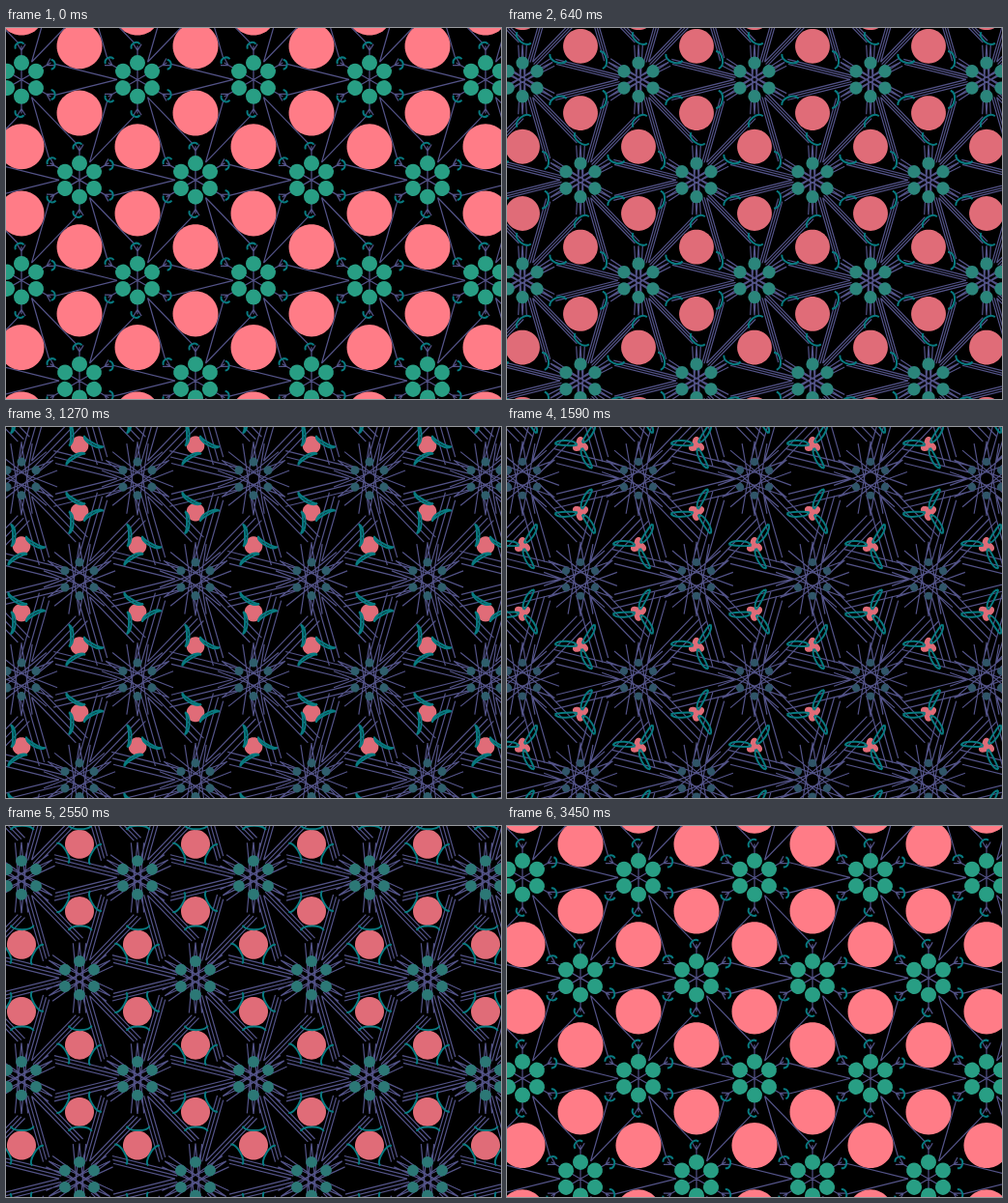
An HTML page with a canvas that plays this animation: 512 px wide and 384 px high, repeating every 3490 ms.

```html
<!DOCTYPE html>
<html lang="en">
<head>
<meta charset="utf-8">
<title>Kaleidoscope tiling</title>
<style>
html, body { margin: 0; width: 100%; height: 100%; overflow: hidden; background: #000; }
canvas { display: block; width: 512px; height: 384px; }
</style>
</head>
<body>
<canvas id="stage" width="512" height="384"></canvas>
<script>
const ctx = document.getElementById('stage').getContext('2d');
const LOOP = 3490, SIDE = 120, ROW = SIDE * Math.sqrt(3) / 2, GAP = SIDE / Math.sqrt(3);
const TAU = Math.PI * 2, RAD = Math.PI / 180;

// Hold time of each step, in hundredths of a second
const holds = '9 9 5 9 9 9 5 9 9 9 4 9 10 9 4 9 9 9 9 5 9 9 9 5 9 9 9 5 9 9 9 5 9 9 9 4 9 9 9 9 5 9 9 4'
  .split(' ').map(Number);

// Teal blade: time, distance and direction of its middle, bulge direction,
// half length, bulge of each of its two edges
const bladeKeys = [
  [0, 35, 93, 240, 5, 4, 4],
  [410, 33, 80, 380, 7.5, 5.5, 5.5],
  [950, 16, 95, 635, 11.5, 5.5, 5.5],
  [1590, 15, 177, 807, 11.5, 4, -1],
  [2000, 19, 134, 800, 11, 7, 7],
  [2550, 20, 88, 990, 12, 4.5, 4.5],
  [3490, 35, 93, 1320, 5, 4, 4]
];

const lerp = (a, b, k) => a + (b - a) * k;
const mix = (a, b, k) => `rgb(${a.map((v, i) => Math.round(lerp(v, b[i], k)))})`;

function stepTime(t) {
  let start = 0;
  for (const h of holds) {
    if (t < start + h * 10) break;
    start += h * 10;
  }
  return start;
}

function bladeAt(t) {
  const i = Math.max(1, bladeKeys.findIndex(k => k[0] > t));
  const a = bladeKeys[i - 1], b = bladeKeys[i];
  const k = (t - a[0]) / (b[0] - a[0]);
  return a.map((v, j) => lerp(v, b[j], k));
}

function at(x, y, draw, flip = 1) {
  ctx.save();
  ctx.translate(x, y);
  ctx.scale(1, flip);
  draw();
  ctx.restore();
}

function turns(n, draw) {
  for (let i = 0; i < n; i++) {
    ctx.save();
    ctx.rotate(i * TAU / n);
    draw();
    ctx.restore();
  }
}

function disc(x, y, r, color) {
  ctx.fillStyle = color;
  ctx.beginPath();
  ctx.arc(x, y, r, 0, TAU);
  ctx.fill();
}

function line(x1, y1, x2, y2) {
  ctx.moveTo(x1, y1);
  ctx.lineTo(x2, y2);
}

// Pink disc that turns three-cornered when smallest, with three teal blades
function blossom(u, blade) {
  const r = 23.5 - 16.5 * u, lobe = 0.28 * u ** 20;
  ctx.fillStyle = mix([255, 124, 135], [224, 108, 120], Math.min(1, u * 7));
  ctx.beginPath();
  for (let a = 0; a < TAU; a += TAU / 60) {
    const d = r * (1 - lobe * Math.sin(3 * a));
    ctx.lineTo(d * Math.cos(a), d * Math.sin(a));
  }
  ctx.fill();

  const [, dist, dir, bulge, half, ...edges] = blade;
  ctx.strokeStyle = '#087a80';
  ctx.lineWidth = 2;
  turns(3, () => {
    ctx.rotate(dir * RAD);
    ctx.translate(dist, 0);
    ctx.rotate((bulge - dir) * RAD);
    ctx.beginPath();
    for (const e of edges) {
      ctx.moveTo(0, -half);
      ctx.bezierCurveTo(e * 4 / 3, -half * 0.8, e * 4 / 3, half * 0.8, 0, half);
    }
    ctx.stroke();
  });
}

// Long lines that split into parallel bundles
function bundles(u) {
  const c = Math.cos(14 * RAD), s = Math.sin(14 * RAD);
  turns(3, () => {
    for (const side of [-1, 1]) {
      for (const part of [0, 0.5, 1]) {
        const off = 14 * u * part, from = -off * 0.4, to = 66 + off * 0.4;
        const x = -21 + s * off, y = c * off;
        line(x - c * from, side * (y + s * from), x - c * to, side * (y + s * to));
      }
    }
  });
}

// Chords around a flower centre that open into a lattice with pointed rays
function star(u) {
  const half = 35 + 3 * u, off = 6.5 * u, barb = 7 * Math.max(0, 1 - u * 10);
  turns(3, () => {
    for (const tilt of [-10 * u, 10 * u]) {
      ctx.save();
      ctx.rotate((30 + tilt) * RAD);
      line(-half, off, half, off);
      line(-half, -off, half, -off);
      ctx.restore();
    }
  });
  if (barb > 0) turns(6, () => {
    ctx.rotate(30 * RAD);
    line(30, 0, 30 + barb, barb * 0.6);
    line(30, 0, 30 + barb, -barb * 0.6);
  });
}

function flower(u) {
  ctx.strokeStyle = '#535388';
  ctx.lineWidth = 1.2;
  ctx.beginPath();
  bundles(u);
  star(u);
  ctx.stroke();
}

function ring(u) {
  const color = mix([40, 158, 132], [48, 84, 104], u);
  turns(6, () => disc(0, GAP / 4, 8 - 4 * u, color));
}

const centres = [];
for (let j = -1; j < 5; j++)
  for (let i = -1; i < 6; i++)
    centres.push([16 + SIDE * i + (j & 1 ? SIDE / 2 : 0), 192 - 2 * GAP + ROW * j]);

function frame(now) {
  const t = stepTime(now % LOOP);
  const u = (1 - Math.cos((t + 50) / LOOP * TAU)) / 2;
  const blade = bladeAt(t);
  ctx.fillStyle = '#000';
  ctx.fillRect(0, 0, 512, 384);
  for (const [x, y] of centres) at(x, y, () => flower(u));
  for (const [x, y] of centres) {
    at(x, y - GAP, () => blossom(u, blade));
    at(x, y + GAP, () => blossom(u, blade), -1);
  }
  for (const [x, y] of centres) at(x, y, () => ring(u));
  requestAnimationFrame(() => frame(performance.now()));
}
frame(performance.now());
</script>
</body>
</html>
```
